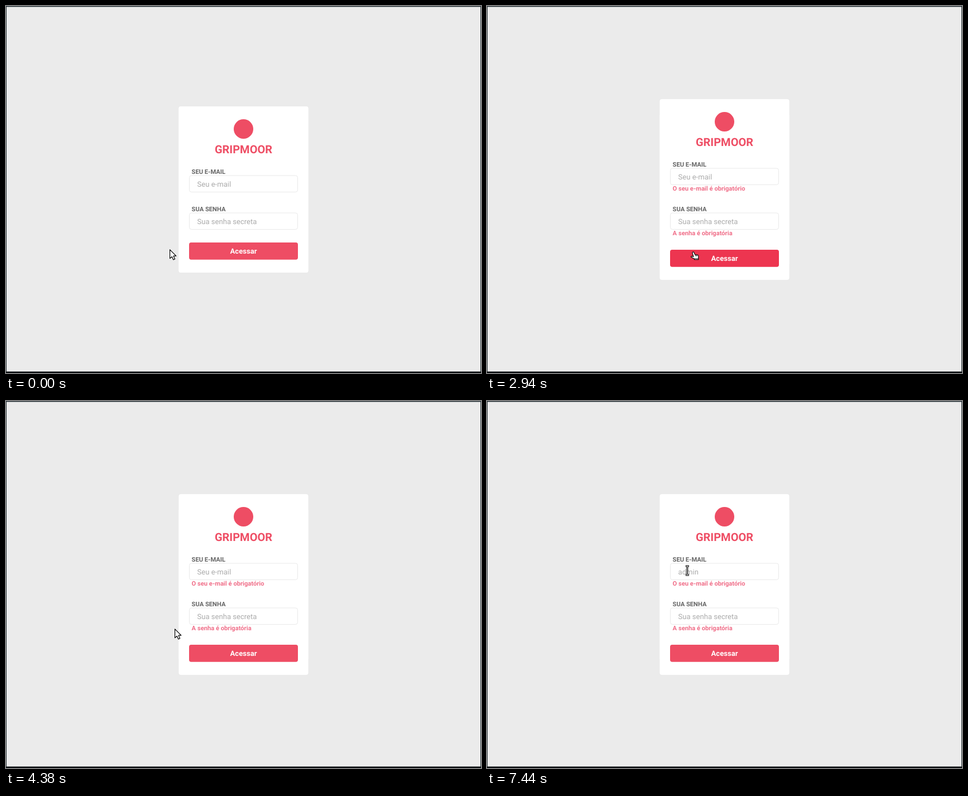
Write an HTML page that moves like this. It is 851 px wide and 658 px high and loops after 8 s.

```html
<!DOCTYPE html>
<html lang="pt-BR">
<head>
<meta charset="utf-8">
<title>Login</title>
<style>
  html, body { margin: 0; width: 100%; height: 100%; overflow: hidden; background: #ebebeb; }
  svg { display: block; width: 851px; height: 658px; }
  text { font: 400 13.06px Roboto, sans-serif; text-rendering: geometricPrecision; }

  .title { font-weight: 700; font-size: 20px; fill: #ee4d64; text-anchor: middle; }
  .label { font-weight: 700; font-size: 11.16px; fill: #666; }
  .error { font-weight: 700; font-size: 11.16px; fill: #f0708a; }
  .action { font-weight: 700; fill: #fff; text-anchor: middle; }
  .hint, .typed { fill: #ababab; }
  .card { fill: #fff; }
  .field { fill: #fff; stroke: #e9e9e9; }

  /* every change is a hard step on one shared 8 s clock */
  .anim { animation: 8s step-end infinite; }
  .up { animation-name: up; }
  .down { animation-name: down; }
  .errors { animation-name: errors; }
  .button { fill: #ee4d64; animation-name: hover; }
  .cursor { animation-name: move; }
  .arrow { animation-name: arrow; }
  .hand { animation-name: hand; }
  .beam { animation-name: beam; }
  .pen { animation-name: type; }
  .caret { fill: #999; animation-name: blink; }
  .empty { animation-name: empty; }
  .filled { animation-name: filled; }

  @keyframes up { 0% { transform: none } 36.75%, 100% { transform: translateY(-13px) } }
  @keyframes down { 0% { transform: none } 36.75%, 100% { transform: translateY(13px) } }
  @keyframes errors { 0% { visibility: hidden } 36.75%, 100% { visibility: visible } }
  @keyframes hover {
    0% { fill: #ee4d64 }
    18.75% { fill: #ee415a }
    21.875% { fill: #ed3550 }
    54.75%, 100% { fill: #ee4d64 }
  }

  /* position of the top left corner of the pointer */
  @keyframes move {
    0% { transform: translate(293px, 436px) }
    16.375% { transform: translate(296px, 436px) }
    17.1875% { transform: translate(304px, 436px) }
    18% { transform: translate(318px, 437px) }
    18.75% { transform: translate(334px, 439px) }
    21.875% { transform: translate(364px, 440px) }
    50% { transform: translate(358px, 440px) }
    51.5625% { transform: translate(342px, 439px) }
    53.125% { transform: translate(323px, 437px) }
    54.75% { transform: translate(302px, 408px) }
    56.25% { transform: translate(310px, 361px) }
    58.625% { transform: translate(333px, 329px) }
    60.125% { transform: translate(348px, 299px) }
    62.5% { transform: translate(355px, 295px) }
    65.625%, 100% { transform: translate(355px, 294px) }
  }
  @keyframes arrow {
    0% { visibility: visible }
    18.75% { visibility: hidden }
    53.125% { visibility: visible }
    60.125%, 100% { visibility: hidden }
  }
  @keyframes hand {
    0% { visibility: hidden }
    18.75% { visibility: visible }
    53.125%, 100% { visibility: hidden }
  }
  @keyframes beam { 0% { visibility: hidden } 60.125%, 100% { visibility: visible } }

  /* the pen is the caret plus a white cover over the letters to come */
  @keyframes type {
    0% { transform: none }
    77.375% { transform: translateX(7px) }
    80.5% { transform: translateX(14px) }
    82.0625% { transform: translateX(26px) }
    83.625% { transform: translateX(29px) }
    86%, 100% { transform: translateX(36px) }
  }
  @keyframes blink {
    0% { visibility: hidden }
    62.5% { visibility: visible }
    70.375% { visibility: hidden }
    77.375% { visibility: visible }
    93%, 100% { visibility: hidden }
  }
  @keyframes empty { 0% { visibility: visible } 77.375%, 100% { visibility: hidden } }
  @keyframes filled { 0% { visibility: hidden } 77.375%, 100% { visibility: visible } }
</style>
</head>
<body>
<svg viewBox="0 0 851 658">
  <rect width="851" height="658" fill="#ebebeb"/>
  <path d="M0 0H851V1.6H0ZM0 0H1V658H0ZM850 0H851V658H850Z" fill="#222d32"/>
  <rect y="655.4" width="851" height="2.6" fill="#0a0e10"/>

  <rect class="card anim up" x="309.5" y="180" width="232" height="298" rx="3.7"/>
  <rect class="card anim down" x="309.5" y="180" width="232" height="298" rx="3.7"/>

  <g class="anim up">
    <circle cx="425.5" cy="220.5" r="17.5" fill="#ee4d64"/>
    <text class="title" x="425.5" y="264">GRIPMOOR</text>
    <text class="label" x="332.6" y="300.6">SEU E-MAIL</text>
    <rect class="field" x="328.5" y="304" width="194" height="29.5" rx="3.7"/>
    <text class="hint anim empty" x="342.6" y="323.8">Seu e-mail</text>
    <text class="typed anim filled" x="342.6" y="323.8">admin</text>
    <g class="anim pen">
      <rect class="anim filled" x="343" y="308" width="60" height="22" fill="#fff"/>
      <rect class="caret anim" x="343" y="312" width="1" height="15"/>
    </g>
  </g>

  <text class="label" x="332.6" y="367.6">SUA SENHA</text>
  <rect class="field" x="328.5" y="371" width="194" height="29.5" rx="3.7"/>
  <text class="hint" x="342.6" y="390.8">Sua senha secreta</text>

  <g class="error anim errors">
    <text class="error" x="332.6" y="331.4">O seu e-mail é obrigatório</text>
    <text class="error" x="332.6" y="411.4">A senha é obrigatória</text>
  </g>

  <g class="anim down">
    <rect class="button anim" x="328" y="424" width="195" height="30.7" rx="3.7"/>
    <text class="action" x="425.5" y="444.4">Acessar</text>
  </g>

  <g class="cursor anim" stroke-linejoin="round">
    <path class="arrow anim" d="M.6 .9V16.6L4.3 13.4L6.9 18.9L9.6 17.7L7.1 12.2H11.8Z" fill="#fff" stroke="#000" stroke-width="1.2"/>
    <path class="hand anim" d="M4.6 1.2C5.6 .5 6.6 1 7 2L8.4 5.6L13.2 6.3Q14.6 6.6 14.8 8V14.8H7.4V13.2L2.2 10.6Q1 9.6 2 8.8Q2.8 8.3 6 9.4L4 3Q3.8 1.8 4.6 1.2ZM9.8 6.2V8.6M12 6.4V8.8M7.6 13H14.6" fill="#fff" stroke="#000" stroke-width="1.1"/>
    <g class="beam anim" fill="none">
      <path d="M.8 2H6.8M3.8 2V18M.8 18H6.8" stroke="#000" stroke-width="3"/>
      <path d="M1.4 2H6.2M3.8 2V18M1.4 18H6.2" stroke="#fff" stroke-width=".9"/>
    </g>
  </g>
</svg>
</body>
</html>
```
